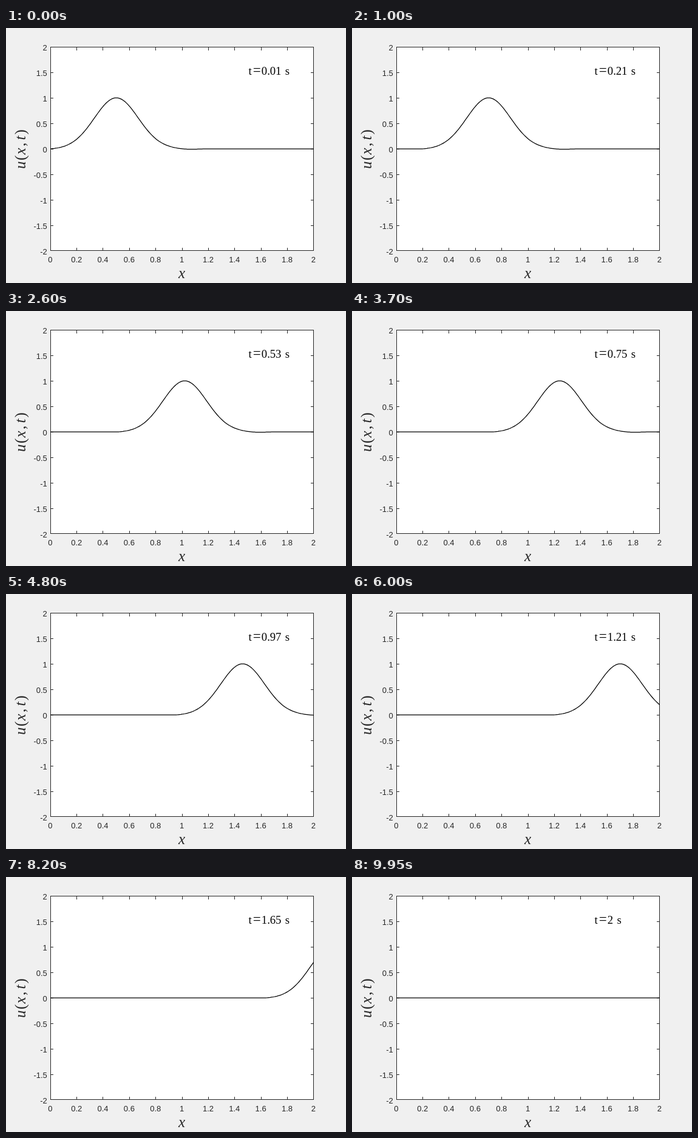
These frames come from a looping animation (560x420 px, 10000 ms). An HTML page:

```html
<!DOCTYPE html>
<html lang="en">
<head>
<meta charset="utf-8">
<title>Travelling pulse</title>
<style>
  html, body { margin: 0; width: 100%; height: 100%; overflow: hidden; background: #f0f0f0; }
  svg { display: block; width: 560px; height: 420px; }
  .tick { font: 13px "Liberation Sans", Arial, sans-serif; fill: #262626; }
  .math { font-family: "Liberation Serif", "Times New Roman", serif; }
  .label { font-size: 25px; fill: #262626; }
  .it { font-style: italic; }
  #clock { font-size: 18.67px; fill: #000; }
</style>
</head>
<body>
<svg viewBox="0 0 560 420">
  <defs><clipPath id="plot"><rect x="73" y="31" width="434" height="336"/></clipPath></defs>
  <rect width="560" height="420" fill="#f0f0f0"/>
  <rect x="73" y="31" width="434" height="336" fill="#fff"/>
  <path id="axes" fill="none" stroke="#262626" shape-rendering="crispEdges"/>
  <g id="ticks" class="tick"></g>
  <path id="wave" fill="none" stroke="#000" stroke-width="1.25" stroke-linejoin="round" clip-path="url(#plot)"/>
  <text class="math label it" x="284" y="411.5">x</text>
  <text class="math label" transform="translate(32 232) rotate(-90)"><tspan class="it" x="0">u</tspan><tspan x="14">(</tspan><tspan class="it" x="23.5">x</tspan><tspan x="37">,</tspan><tspan class="it" x="47.5">t</tspan><tspan x="56.5">)</tspan></text>
  <text id="clock" class="math" y="77"><tspan x="399.5">t</tspan><tspan x="406.8" font-size="23">=</tspan><tspan id="num" x="420.8"></tspan><tspan dx="6.4">s</tspan></text>
</svg>
<script>
const LEFT = 73.25, TOP = 31.5, RIGHT = 506.75, BOTTOM = 366.5, TICK = 5;
const STEP = 50, COUNT = 200;
const $ = id => document.getElementById(id);
const px = x => LEFT + x * (RIGHT - LEFT) / 2;
const py = u => 199 - 84 * u;

function addLabel(value, x, y, anchor) {
  const t = document.createElementNS("http://www.w3.org/2000/svg", "text");
  t.setAttribute("x", x);
  t.setAttribute("y", y);
  t.setAttribute("text-anchor", anchor);
  t.textContent = value;
  $("ticks").append(t);
}

function drawAxes() {
  let d = `M${LEFT} ${TOP}H${RIGHT}V${BOTTOM}H${LEFT}Z`;
  for (let i = 0; i <= 10; i++) {
    const x = px(i / 5);
    d += `M${x} ${TOP}v${TICK}M${x} ${BOTTOM}v${-TICK}`;
    addLabel(i / 5, x - 0.4, 386, "middle");
  }
  for (let i = -4; i <= 4; i++) {
    const y = Math.min(py(i / 2) + 0.5, BOTTOM);
    d += `M${LEFT} ${y}h${TICK}M${RIGHT} ${y}h${-TICK}`;
    addLabel(i / 2, 67.8, py(i / 2) + 6, "end");
  }
  $("axes").setAttribute("d", d);
}

// Bell with a sharp foot on the left and a faint undershoot on the right.
function pulse(s) {
  if (s <= -0.5) return 0;
  const bell = Math.exp(-s * s / 0.0555);
  const foot = 0.011 * Math.min(1, Math.max(0, -s * 2));
  return bell - foot - 0.012 * Math.exp(-(((s - 0.54) / 0.1) ** 2));
}

function render(ms) {
  const n = Math.floor(ms / STEP) % COUNT;
  const centre = 0.5 + n / 100;
  let d = "";
  for (let i = 0; i <= 200; i++) {
    const x = i / 100;
    d += (i ? "L" : "M") + px(x).toFixed(2) + " " + py(pulse(x - centre)).toFixed(2);
  }
  $("wave").setAttribute("d", d);
  $("num").textContent = (n + 1) / 100;
}

drawAxes();
render(0);
const start = performance.now();
function loop() {
  render(performance.now() - start);
  requestAnimationFrame(loop);
}
requestAnimationFrame(loop);
</script>
</body>
</html>
```
